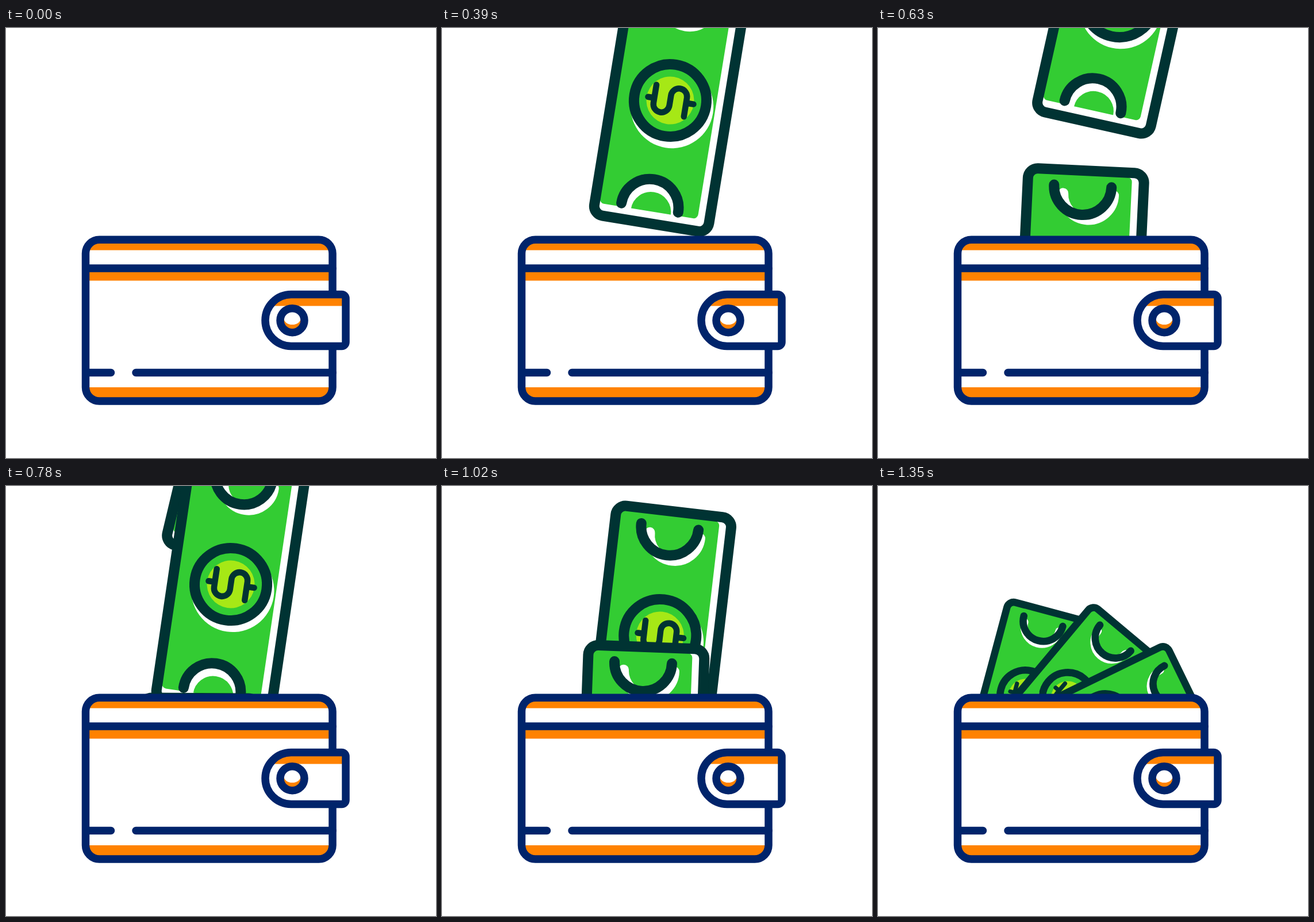
An HTML page that plays this animation: 748 px wide and 748 px high, repeating every 2.19 s.

```html
<!DOCTYPE html>
<html lang="en">
<head>
<meta charset="utf-8">
<title>Wallet</title>
<style>
  html, body { margin: 0; height: 100%; overflow: hidden; background: #fff; }
  svg { display: block; width: 100vw; height: 100vh; }
  .ink { fill: none; stroke: #033; stroke-width: 18; stroke-linecap: round; stroke-linejoin: round; }
  .navy { fill: none; stroke: #00246b; stroke-width: 13.5; stroke-linecap: round; }
  .white { fill: none; stroke: #fff; stroke-width: 18; stroke-linecap: round; }
  .green { fill: #3c3; }
  .orange { fill: #ff8200; }
  .shade { transform: translate(var(--dx, 5.5px), -176px); }
  #fan { --dx: -5px; }
</style>
</head>
<body>
<svg viewBox="0 0 748 748">
  <defs>
    <g id="bill">
      <rect x="-101" y="-217" width="202" height="434" rx="17" fill="#fff"/>
      <rect class="green" x="-93" y="-209" width="173" height="405" rx="8"/>
      <path class="white shade" d="M-44 0A44 44 0 0 0 44 0"/>
      <path class="white" d="M-46 197A44 44 0 0 1 42 197"/>
      <circle cx="5" cy="10.5" r="72" fill="#fff"/>
      <circle class="green" r="66"/>
      <circle r="41.5" fill="#a6e816"/>
      <circle class="ink" r="63"/>
      <path class="ink" style="stroke-width:10.5" d="M-28-23V9A14 14 0 0 0 0 9V-9A14 14 0 0 1 28-9V24M-39 0H-28M28 0H41"/>
      <path class="ink" d="M-55-190A50 50 0 0 0 45-190M-55 190A50 50 0 0 1 45 190"/>
      <rect class="ink" x="-101" y="-217" width="202" height="434" rx="17"/>
    </g>
    <clipPath id="above"><rect id="mask" y="-700" width="748" height="1064"/></clipPath>
    <clipPath id="body"><rect x="138.5" y="368.3" width="429.5" height="280.7" rx="24"/></clipPath>
    <clipPath id="flap"><path d="M496 463.5H591V553.5H496A45 45 0 0 1 496 463.5Z"/></clipPath>
  </defs>

  <g clip-path="url(#above)">
    <g id="falling"></g>
    <g id="fan">
      <use href="#bill" transform="translate(256.5 364.5) rotate(15) scale(.7)"/>
      <use href="#bill" transform="translate(330 368.5) rotate(40) scale(.7)"/>
      <use href="#bill" transform="translate(395.5 405.5) rotate(64) scale(.7)"/>
    </g>
  </g>

  <g id="wallet">
    <rect x="138.5" y="368.3" width="429.5" height="280.7" rx="24" fill="#fff"/>
    <g class="orange" clip-path="url(#body)">
      <rect x="138" y="368" width="430" height="18.5"/>
      <rect x="138" y="420" width="430" height="19.5"/>
      <rect x="138" y="625" width="430" height="24"/>
    </g>
    <path class="navy" d="M139 418H568M139 599.5H182.5M226 599.5H568"/>
    <rect class="navy" x="138.5" y="368.3" width="429.5" height="280.7" rx="24"/>
    <g clip-path="url(#flap)">
      <rect x="444" y="457" width="154" height="103" fill="#fff"/>
      <rect class="orange" x="444" y="463" width="154" height="20.5"/>
    </g>
    <path class="navy" d="M496 463.5H584A7 7 0 0 1 591 470.5V546.5A7 7 0 0 1 584 553.5H496A45 45 0 0 1 496 463.5Z"/>
    <circle class="orange" cx="498" cy="508.7" r="16"/>
    <ellipse cx="498" cy="504.5" rx="15" ry="11.5" fill="#fff"/>
    <circle class="navy" cx="498" cy="508.7" r="21"/>
  </g>
</svg>
<script>
  const LOOP = 2190, STEP = 30;
  const DELAYS = [540, 360, 0]; // back to front
  const FALL = [[30, -252], [60, -236], [120, -202], [180, -155], [240, -89], [270, -47], [390, 126],
    [420, 171], [480, 260], [630, 465], [660, 497], [780, 586], [840, 612]];
  const DIP = [[1110, 0], [1140, 1.5], [1170, 5.5], [1200, 10.5], [1230, 15], [1260, 17], [1290, 12], [1320, 5], [1350, 0]];
  const RISE = [[1230, 130], [1260, 45], [1290, -22], [1320, -38], [1350, 0]];

  const $ = id => document.getElementById(id);
  const falling = $('falling'), fan = $('fan'), wallet = $('wallet'), mask = $('mask');

  const bills = DELAYS.map(() => {
    const use = document.createElementNS('http://www.w3.org/2000/svg', 'use');
    use.setAttribute('href', '#bill');
    return falling.appendChild(use);
  });

  // Smooth curve through [time, value] pairs, clamped at both ends.
  function at(keys, t) {
    const last = keys.length - 1;
    if (t <= keys[0][0]) return keys[0][1];
    if (t >= keys[last][0]) return keys[last][1];
    const i = keys.findIndex(k => k[0] > t) - 1;
    const slope = n => {
      const a = keys[Math.max(n - 1, 0)], b = keys[Math.min(n + 1, last)];
      return (b[1] - a[1]) / (b[0] - a[0]);
    };
    const [t0, v0] = keys[i], [t1, v1] = keys[i + 1];
    const d = t1 - t0, u = (t - t0) / d, w = 1 - u;
    return w * w * (1 + 2 * u) * v0 + u * u * (1 + 2 * w) * v1
      + d * u * w * (w * slope(i) - u * slope(i + 1));
  }

  const show = (el, on) => el.setAttribute('visibility', on ? 'visible' : 'hidden');

  function draw(t) {
    bills.forEach((bill, i) => {
      const age = t - DELAYS[i];
      const y = at(FALL, age);
      show(bill, age >= 60 && age < 840);
      bill.setAttribute('transform', `translate(${413.6 - 0.132 * y} ${y}) rotate(${11.7 - 0.0193 * y})`);
    });
    const dip = at(DIP, t);
    wallet.setAttribute('transform', `translate(0 ${dip})`);
    mask.setAttribute('height', 1064 + dip);
    show(fan, t >= 1230);
    fan.setAttribute('transform', `translate(0 ${at(RISE, t)})`);
  }

  const start = performance.now();
  function tick() {
    const t = (performance.now() - start) % LOOP;
    draw(Math.floor(t / STEP) * STEP);
    requestAnimationFrame(tick);
  }
  tick();
</script>
</body>
</html>
```
